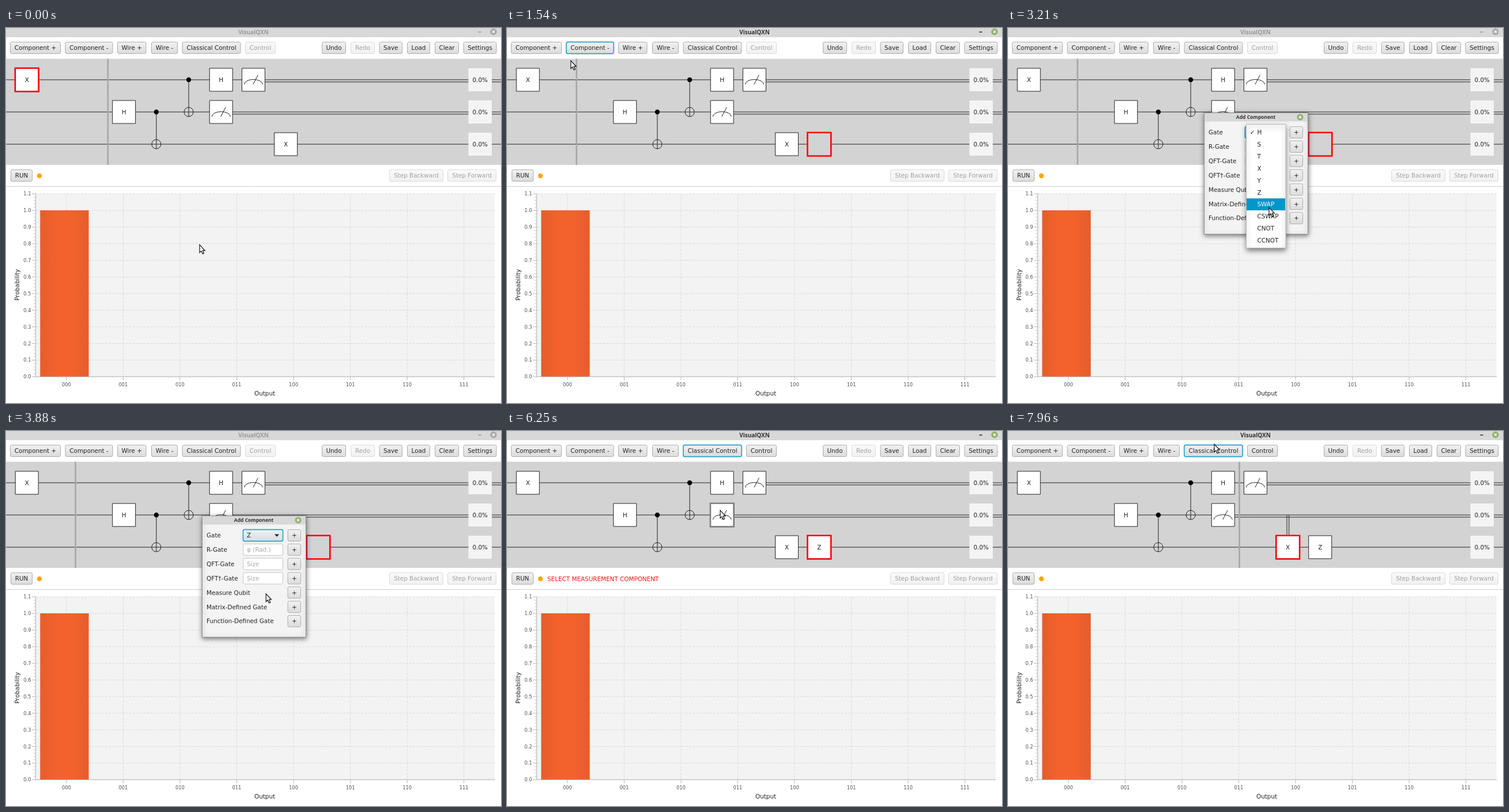
Recreate the animation shown at these times as an HTML page with a canvas. Size 859 by 652 pixels, loop 8 s.

```html
<!DOCTYPE html>
<html lang="en">
<head>
<meta charset="utf-8">
<title>Circuit editor</title>
<style>
  html, body { margin: 0; width: 100%; height: 100%; overflow: hidden; background: #fff; }
  canvas { display: block; }
</style>
</head>
<body>
<canvas id="stage" width="859" height="652"></canvas>
<script>
const ctx = document.getElementById('stage').getContext('2d');
const LOOP = 8000, COL = 56.17, ROWS = [90, 146, 202];
const SANS = '"DejaVu Sans", sans-serif', TITLE = '"Noto Sans", sans-serif';
const ITEMS = ['H', 'S', 'T', 'X', 'Y', 'Z', 'SWAP', 'CSWAP', 'CNOT', 'CCNOT'];

// Pointer path [time, x, y]: gliding until GLIDE_END, then jumping from stop to stop
const GLIDE_END = 4290;
const POINTER = [
  [0, 336, 377], [170, 336, 377], [960, 513, 193], [1080, 523, 193], [1539, 523, 193],
  [1540, 111, 57], [1830, 49, 30], [2000, 49, 30], [2080, 35, 25], [2210, 35, 25],
  [2580, 350, 132], [3040, 440, 180], [3110, 440, 180], [3210, 453, 312], [3400, 455, 318],
  [3670, 450, 286], [3870, 450, 286], [4290, 497, 178],
  [4830, 470, 138], [4960, 425, 90], [5080, 391, 60], [5250, 313, 30], [5500, 310, 31],
  [5710, 308, 32], [5880, 322, 68], [5980, 348, 104], [6080, 368, 129], [6250, 370, 138],
  [6570, 400, 160], [6670, 453, 190], [6880, 468, 200], [7000, 473, 202], [7500, 462, 188],
  [7670, 398, 62], [7790, 352, 12], [7960, 358, 23]
];
// Column marker [time, column boundary], -1 hides it
const MARKER = [[0, 3], [770, 8], [860, 9], [1540, 2], [4830, 8], [4960, 7], [5250, 6],
  [6080, -1], [6570, 7], [6670, 8], [6880, -1], [7670, 7]];
const FOCUS = [[0, ''], [1540, 'Component -'], [2250, 'Component +'], [3130, ''], [5420, 'Classical Control']];
const MESSAGE = [[0, ''], [5420, 'SELECT MEASUREMENT COMPONENT'], [6460, 'SELECT COMPONENT TO CONTROL'], [7330, '']];
const SELECTED = [[0, [0, 0]], [1540, [9, 2]], [6460, null], [7330, [8, 2]]];
const HOVERED = [[0, null], [6080, [6, 1]], [6570, null], [6880, [8, 2]], [7330, null]];
const ACTIVE = [[0, false], [1540, true], [2620, false], [5420, true]];
const CAN_CONTROL = [[0, false], [4630, true], [6460, false], [7330, true]];

const current = (track, t) => track.filter(k => k[0] <= t).pop()[1];

function pointerAt(t) {
  const i = POINTER.findLastIndex(k => k[0] <= t);
  const [t0, x0, y0] = POINTER[i];
  if (t >= GLIDE_END) return [x0, y0];
  const [t1, x1, y1] = POINTER[i + 1], p = (t - t0) / (t1 - t0);
  return [x0 + (x1 - x0) * p, y0 + (y1 - y0) * p];
}

function rect(x, y, w, h, fill, stroke, width = 1, radius = 0) {
  ctx.beginPath();
  ctx.roundRect(x, y, w, h, radius);
  if (fill) { ctx.fillStyle = fill; ctx.fill(); }
  if (stroke) { ctx.strokeStyle = stroke; ctx.lineWidth = width; ctx.stroke(); }
}

function line(x0, y0, x1, y1, color = '#222', width = 1) {
  ctx.beginPath();
  ctx.moveTo(x0, y0);
  ctx.lineTo(x1, y1);
  ctx.strokeStyle = color;
  ctx.lineWidth = width;
  ctx.stroke();
}

function disc(x, y, r, fill, stroke) {
  ctx.beginPath();
  ctx.arc(x, y, r, 0, 7);
  if (fill) { ctx.fillStyle = fill; ctx.fill(); }
  if (stroke) { ctx.strokeStyle = stroke; ctx.lineWidth = 1; ctx.stroke(); }
}

// y is the vertical middle of the capitals
function text(s, x, y, { color = '#222', size = 10.4, align = 'center', family = SANS, weight = '' } = {}) {
  ctx.font = `${weight} ${size}px ${family}`;
  ctx.textAlign = align;
  ctx.fillStyle = color;
  ctx.fillText(s, x, y + size * .37);
}

function withShadow(blur, dy, draw) {
  ctx.save();
  ctx.shadowColor = 'rgba(0,0,0,.5)';
  ctx.shadowBlur = blur;
  ctx.shadowOffsetY = dy;
  draw();
  ctx.restore();
}

function button(label, x, y, w, { focus = false, enabled = true } = {}) {
  const fill = ctx.createLinearGradient(0, y, 0, y + 20);
  fill.addColorStop(0, '#f1f1f1');
  fill.addColorStop(1, '#dcdcdc');
  ctx.globalAlpha = enabled ? 1 : .4;
  if (focus) rect(x, y, w, 20, null, '#bde4f1', 3, 3);
  rect(x, y, w, 20, fill, focus ? '#1b9fc9' : '#adadad', focus ? 1.4 : 1, 2.5);
  text(label, x + w / 2, y + 10);
  ctx.globalAlpha = 1;
}

function closeIcon(x, y, r, active) {
  disc(x, y, r, active ? '#91b06d' : '#a9a9a9');
  const d = r * .36;
  line(x - d, y - d, x + d, y + d, '#fff', 1.4);
  line(x - d, y + d, x + d, y - d, '#fff', 1.4);
}

function drawTitleBar(active) {
  const color = active ? '#333' : '#999';
  rect(0, 0, 859, 16, '#d8d8d8');
  text('VisualQXN', 429.5, 7.5, { color, size: 10, family: TITLE, weight: 'bold' });
  line(819.5, 7, 824.5, 7, color, 1.6);
  closeIcon(846, 6.5, 5.7, active);
}

function drawToolbars(t) {
  const focus = current(FOCUS, t);
  const off = { Redo: true, Control: !current(CAN_CONTROL, t) };
  [['Component +', 7.5, 87], ['Component -', 103, 82], ['Wire +', 193.5, 49.5], ['Wire -', 252.5, 45],
   ['Classical Control', 306, 101], ['Control', 415.5, 52], ['Undo', 548.5, 41], ['Redo', 598.5, 41],
   ['Save', 648, 39.5], ['Load', 696.5, 39], ['Clear', 744.5, 41], ['Settings', 794, 57]]
    .forEach(([label, x, w]) => button(label, x, 24.5, w, { focus: label === focus, enabled: !off[label] }));
  button('RUN', 8.5, 246.5, 37);
  button('Step Backward', 665.5, 246.5, 93, { enabled: false });
  button('Step Forward', 766.5, 246.5, 84, { enabled: false });
  disc(58, 257, 4.2, '#ffa500');
  text(current(MESSAGE, t), 70, 256.7, { color: '#ff1414', align: 'left' });
  line(0, 275.5, 859, 275.5, '#cfcfcf');
}

const center = col => 36.2 + COL * col;

function gate(label, col, row) {
  const x = center(col), y = ROWS[row];
  rect(x - 20, y - 20, 40, 40, '#fff', '#222');
  if (label !== 'M') return text(label, x, y);
  ctx.beginPath();
  ctx.ellipse(x, y + 8, 16, 8.5, 0, Math.PI, 0);
  ctx.stroke();
  line(x - .5, y + 8, x + 8, y - 8.5);
}

function controlledNot(col, row) {
  const x = center(col), y = ROWS[row], target = ROWS[row + 1];
  line(x, y, x, target + 8);
  disc(x, y, 4.2, '#000');
  disc(x, target, 8, null, '#222');
}

function outline([col, row], color) {
  rect(center(col) - 20.3, ROWS[row] - 20.3, 40.8, 40.8, null, color, 2.6);
}

function drawCircuit(t) {
  const selected = current(SELECTED, t), hovered = current(HOVERED, t), marker = current(MARKER, t);
  rect(0, 53.5, 859, 184.5, '#d3d3d3');
  ROWS.forEach(y => line(0, y, 859, y));
  line(430, 93.8, 859, 93.8);
  line(373, 149.8, 859, 149.8);
  if (t >= 7330) [484, 487.7].forEach(x => line(x, 146, x, 182));
  if (marker >= 0) rect(center(marker) - 29.3, 53.5, 2.8, 184.5, '#a9a9a9');
  gate('X', 0, 0);
  gate('H', 3, 1);
  controlledNot(4, 1);
  controlledNot(5, 0);
  gate('H', 6, 0);
  gate('M', 6, 1);
  gate('M', 7, 0);
  gate('X', 8, 2);
  if (t >= 4630) gate('Z', 9, 2);
  else if (t >= 1540) rect(center(9) - 20, 182, 40, 40, '#d3d3d3');
  if (hovered) outline(hovered, '#808080');
  if (selected) outline(selected, '#f00');
  ROWS.forEach(y => {
    rect(802.5, y - 20, 40.5, 40, '#f4f4f4');
    text('0.0%', 822.7, y);
  });
}

function drawChart() {
  const left = 52, right = 848, top = 288.3, base = 606.3, step = (base - top) / 11;
  rect(left, top, right - left, base - top, '#f3f3f3');
  const tickStyle = { size: 8.3, color: '#505050' };
  for (let i = 0; i <= 11; i++) {
    const y = base - i * step;
    ctx.setLineDash([4, 2]);
    line(left, y, right, y, '#dadada');
    ctx.setLineDash([]);
    line(left - 7, y, left, y, '#b4b4b4');
    for (let m = 1; m < 5 && i < 11; m++) line(left - 4, y - m * step / 5, left, y - m * step / 5, '#c4c4c4');
    text((i / 10).toFixed(1), 43.5, y, { ...tickStyle, align: 'right' });
  }
  for (let i = 0; i < 8; i++) {
    const x = 104.8 + i * 98.55;
    ctx.setLineDash([4, 2]);
    line(x, top, x, base, '#dadada');
    ctx.setLineDash([]);
    line(x, base, x, base + 6, '#b4b4b4');
    text(i.toString(2).padStart(3, '0'), x, 620, tickStyle);
  }
  const fill = ctx.createLinearGradient(59, 0, 144, 0);
  [[0, '#e65d2c'], [.35, '#f3622d'], [.65, '#f3622d'], [1, '#e65d2c']].forEach(s => fill.addColorStop(...s));
  rect(59.3, 317, 84.3, base - 317, fill);
  line(left - .5, top, left - .5, base, '#b4b4b4');
  line(left - 1, base, right, base, '#b4b4b4');
  text('Output', 449, 635.5);
  ctx.save();
  ctx.translate(19.5, 446.5);
  ctx.rotate(-Math.PI / 2);
  text('Probability', 0, 0);
  ctx.restore();
}

function drawDialog(t) {
  const active = t >= 2620, plusFocus = t >= 4250;
  withShadow(active ? 8 : 4, 2, () => rect(340.5, 147.5, 180, 211, '#f4f4f4', '#8c8c8c'));
  rect(341, 148, 179, 14.5, '#d8d8d8');
  text('Add Component', 430, 155, { color: active ? '#333' : '#999', size: 8.5, family: TITLE, weight: 'bold' });
  closeIcon(507, 155, 5.5, active);
  ['Gate', 'R-Gate', 'QFT-Gate', 'QFT†-Gate', 'Measure Qubit', 'Matrix-Defined Gate', 'Function-Defined Gate']
    .forEach((label, i) => {
      const y = 181.5 + i * 24.85;
      text(label, 348, y, { align: 'left' });
      button('+', 489, y - 10, 22.5, { focus: plusFocus && i === 0 });
      if (i > 0 && i < 4) {
        rect(411.5, y - 10, 69, 20, '#fff', '#c4c4c4', 1, 2.5);
        text(i === 1 ? 'φ (Rad.)' : 'Size', 418, y, { align: 'left', color: '#aaa' });
      }
    });
  button('', 411.5, 171.5, 69, { focus: !plusFocus });
  text(t < 3880 ? 'H' : 'Z', 418, 181.5, { align: 'left' });
  ctx.beginPath();
  ctx.moveTo(466, 179.5);
  ctx.lineTo(474, 179.5);
  ctx.lineTo(470, 184);
  ctx.fill();
}

function drawMenu(pointerY) {
  const pitch = 20.85, hot = Math.floor((pointerY - 171) / pitch);
  withShadow(9, 4, () => rect(413.5, 167.5, 68.5, 215, '#fff', '#bbb'));
  ITEMS.forEach((label, i) => {
    const y = 181.5 + i * pitch, color = i === hot ? '#fff' : '#222';
    if (i === hot) rect(414, y - 10.4, 67, pitch, '#0096c9');
    text(label, 432.5, y, { align: 'left', color });
    if (i === 0) text('✓', 424, y, { color });
  });
}

function drawPointer(x, y) {
  ctx.save();
  ctx.translate(x, y);
  const shape = new Path2D('M0 0V13.5L3 10.8L5.2 15.8L7.5 14.8L5.3 9.9H9.2Z');
  ctx.fillStyle = '#fff';
  ctx.strokeStyle = '#000';
  ctx.lineWidth = 1.1;
  ctx.fill(shape);
  ctx.stroke(shape);
  ctx.restore();
}

function frame(now) {
  const t = now % LOOP, [x, y] = pointerAt(t);
  rect(0, 0, 859, 652, '#fff');
  drawTitleBar(current(ACTIVE, t));
  drawToolbars(t);
  drawCircuit(t);
  drawChart();
  if (t >= 2540 && t < 4630) drawDialog(t);
  if (t >= 3130 && t < 3880) drawMenu(y);
  drawPointer(x, y);
  requestAnimationFrame(frame);
}
requestAnimationFrame(frame);
</script>
</body>
</html>
```
